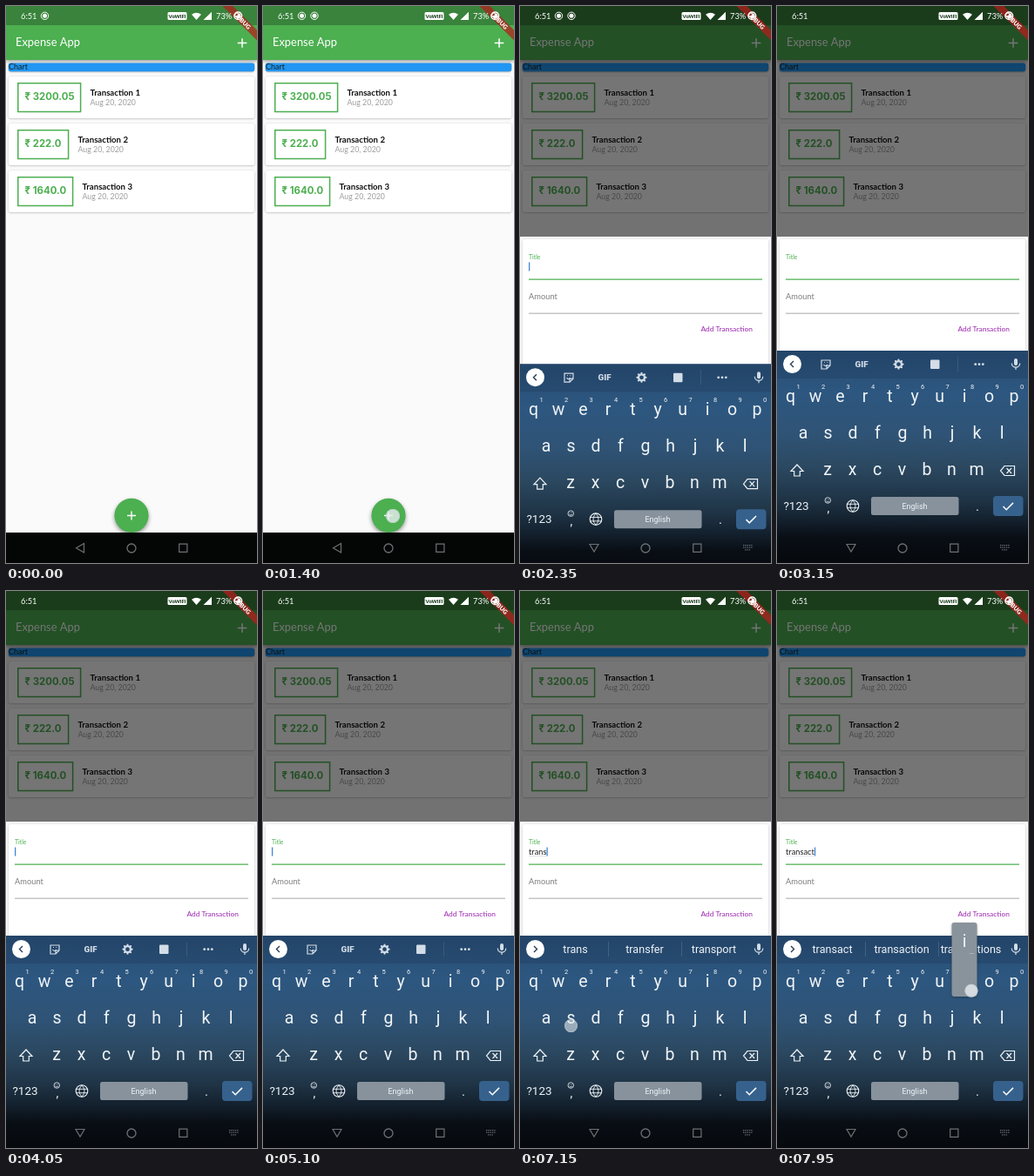
Write an HTML page with a canvas that moves like this. It is 288 px wide and 640 px high and loops after 8000 ms.

```html
<!DOCTYPE html>
<html lang="en">
<head>
<meta charset="utf-8">
<title>Expense App</title>
<style>
html, body { margin: 0; width: 100%; height: 100%; overflow: hidden; background: #000; }
canvas { display: block; width: 288px; height: 640px; }
</style>
</head>
<body>
<canvas id="stage"></canvas>
<script>
const canvas = document.getElementById('stage');
const c = canvas.getContext('2d');
const dpr = window.devicePixelRatio || 1;
canvas.width = 288 * dpr;
canvas.height = 640 * dpr;

const LOOP = 8000, GREEN = '#4caf50';
const SHEET_IN = 1500, FOCUS = 2040, KEYBOARD_IN = 2200;
const APP = 'Lato, sans-serif', KEYS = 'Roboto, sans-serif', BOLD = 'Inter, sans-serif';

const clamp = v => Math.max(0, Math.min(1, v));
const easeOut = v => 1 - (1 - clamp(v)) ** 3;

function text(str, x, y, size, color, { font = APP, weight = 400, align = 'left' } = {}) {
  c.font = `${weight} ${size}px ${font}`;
  c.textAlign = align;
  c.fillStyle = color;
  c.fillText(str, x, y);
}
const keyText = (str, x, y, size, weight = 400) =>
  text(str, x, y, size, '#f0f4f7', { font: KEYS, align: 'center', weight });

function fill(d, color) {
  c.fillStyle = color;
  c.fill(new Path2D(d));
}
function line(d, color, width = 1) {
  c.strokeStyle = color;
  c.lineWidth = width;
  c.stroke(new Path2D(d));
}
function box(x, y, w, h, color, r = 0) {
  c.fillStyle = color;
  c.beginPath();
  c.roundRect(x, y, w, h, r);
  c.fill();
}
function disc(x, y, r, color) {
  c.fillStyle = color;
  c.beginPath();
  c.arc(x, y, r, 0, 7);
  c.fill();
}
function ring(x, y, r, color, width = 1) {
  c.strokeStyle = color;
  c.lineWidth = width;
  c.beginPath();
  c.arc(x, y, r, 0, 7);
  c.stroke();
}
function shadowed(draw, blur = 2, dy = 0.8, alpha = 0.35) {
  c.save();
  c.shadowColor = `rgba(0,0,0,${alpha})`;
  c.shadowBlur = blur * dpr;
  c.shadowOffsetY = dy * dpr;
  draw();
  c.restore();
}
const card = (y, h, color) => shadowed(() => box(2.8, y, 282.4, h, color, 2.8), 2, 0.6, 0.3);

// A finger dot that fades out after release
function touch(t, x, y, down, up, r = 8) {
  const fade = 150;
  if (t < down || t > up + fade) return;
  c.globalAlpha = 0.8 * (1 - clamp((t - up) / fade));
  disc(x, y, r, '#e9eef0');
  ring(x, y, r - 0.5, '#c3ccd2');
  c.globalAlpha = 1;
}

function home() {
  box(0, 0, 288, 605, '#fafafa');
  shadowed(() => box(0, 0, 288, 62, GREEN), 4, 1.5);
  box(0, 0, 288, 22, '#39833c');
  text('Expense App', 11, 46.3, 12.9, '#fff');
  line('M265.7 42.5h10.6M271 37.2v10.6', '#fff', 1.5);

  card(65.5, 9.8, '#2196f3');
  text('Chart', 3, 73.4, 9, '#122');

  [['3200.05', 73], ['222.0', 59], ['1640.0', 64]].forEach(([amount, w], i) => {
    const y = 81 + 54 * i;
    card(y, 48, '#fff');
    c.strokeStyle = GREEN;
    c.lineWidth = 1.5;
    c.strokeRect(13.8, y + 7.7, w - 1.2, 32.8);
    text('₹ ' + amount, 21.5, y + 27.3, 11.4, GREEN, { font: BOLD, weight: 700 });
    text('Transaction ' + (i + 1), 23.5 + w, y + 22.3, 9.65, '#111', { weight: 700 });
    text('Aug 20, 2020', 23.5 + w, y + 33, 8.8, '#9e9e9e');
  });

  shadowed(() => disc(144, 585.3, 19.6, GREEN), 5, 2.5, 0.4);
  line('M139 585.5h10M144 580.5v10', '#fff', 1.4);
}

function sheet(t, typed) {
  const p = easeOut((t - SHEET_IN) / 250);
  if (!p) return;
  box(0, 0, 288, 605, `rgba(0,0,0,${0.54 * p})`);
  c.save();
  c.beginPath();
  c.rect(0, 0, 288, 605);
  c.clip();
  c.translate(0, 340 * (1 - p));
  box(0, 265, 288, 340, '#fafafa');
  card(268, 334, '#fff');

  const focused = t >= FOCUS;
  const f = easeOut((t - FOCUS) / 200);
  text('Title', 10, 303 - 12 * f, 9.3 - 2.4 * f, focused ? GREEN : '#808080');
  box(10, focused ? 313.4 : 313.8, 268, focused ? 1.4 : 0.7, focused ? GREEN : '#8c8c8c');
  text('Amount', 10, 337, 9.3, '#7d7d7d');
  box(10, 352.8, 268, 0.7, '#8c8c8c');
  text('Add Transaction', 207.5, 374, 8.4, '#9c27b0');

  text(typed, 10, 303, 9.3, '#222');
  const w = c.measureText(typed).width;
  if (typed) box(10, 304.2, w, 0.4, 'rgba(0,0,0,.3)');
  const blinkOn = Math.floor((t - 4750) / 650) % 2 === 0;
  if (focused && (typed || blinkOn)) box(10 + w, 294.5, 1.3, 10, '#4285d4');
  c.restore();
}

function debugBanner() {
  c.save();
  c.translate(288, 0);
  c.rotate(Math.PI / 4);
  box(-40, 19.6, 80, 8.4, 'rgba(183,28,28,.72)');
  text('DEBUG', 0, 26.4, 7, '#fff', { weight: 900, align: 'center' });
  c.restore();
}

function statusBar(t) {
  text('6:51', 17, 14.6, 9.3, '#fff');
  const recorders = t < 700 ? 1 : t < 2900 ? 2 : 0;
  for (let i = 0; i < recorders; i++) {
    ring(44.5 + 14.5 * i, 11.3, 4.2, '#fff');
    disc(44.5 + 14.5 * i, 11.3, 2.5, '#fff');
  }
  box(185.5, 7, 22, 9, '#fff', 1.5);
  text('VoWiFi', 196.5, 13.8, 6, '#284a2c', { weight: 900, align: 'center' });
  fill('M213 9.8Q218.5 5.8 224 9.8L218.5 16Z', '#fff');
  fill('M226.5 16H236V6.8Z', '#fff');
  text('73%', 241, 14.6, 9.3, '#fff');
  ring(266.3, 11.3, 4.3, '#fff', 1.5);
  fill('M266.3 11.3V8.3A3 3 0 1 1 263.3 11.3Z', '#fff');
}

const ROWS = [['qwertyuiop', 15.5, 449], ['asdfghjkl', 30, 491], ['zxcvbnm', 58, 533]];
function keyAt(ch) {
  const [letters, x, y] = ROWS.find(([row]) => row.includes(ch));
  return [x + 28.5 * letters.indexOf(ch), y];
}

// Each press: letter, time down, time up
const presses = [...'transacti'].map((ch, i) =>
  i ? [ch, 6060 + 220 * i, 6230 + 220 * i] : [ch, 5950, 6240]);

const SUGGESTIONS = [
  't thanks thank', 'tr try trying', 'tra travel train', 'tran transfer trans',
  'trans transfer transport', 'transa transaction transactions',
  'transac transaction transactions', 'transact transaction transactions'
];

function toolbar(typed) {
  disc(17.5, 411.5, 10.5, '#fff');
  line(typed ? 'M16 408l3.5 3.5l-3.5 3.5' : 'M19 408l-3.5 3.5l3.5 3.5', '#263c55', 1.4);
  const pale = '#d3dde7';
  if (typed) {
    SUGGESTIONS[typed.length - 1].split(' ').forEach((word, i) =>
      keyText(word, 63.5 + 79.5 * i, 416.3, 12.6));
    line('M101.5 403v17M185.5 403v17', 'rgba(255,255,255,.2)', 0.7);
  } else {
    line('M51 407h10v6l-4 4h-6zM61 413h-4v4M53.5 412q2 3 4 0M54 409.5h.8M57.5 409.5h.8', pale, 1.2);
    text('GIF', 97, 415.2, 9.8, pale, { font: KEYS, weight: 900, align: 'center' });
    ring(139.5, 411.7, 3.5, pale, 2.2);
    for (let i = 0; i < 8; i++) {
      const a = i * Math.PI / 4;
      disc(139.5 + 5 * Math.cos(a), 411.7 + 5 * Math.sin(a), 1.1, pale);
    }
    box(176, 406.5, 10.5, 10.5, pale, 1);
    line('M207.5 403v17', 'rgba(255,255,255,.15)', 0.7);
    for (let i = -1; i < 2; i++) disc(232 + 4.3 * i, 411.7, 1.4, pale);
  }
  box(272, 405, 4, 8, pale, 2);
  line('M269.3 410.5a4.7 4.7 0 0 0 9.4 0M274 415v3', pale, 1.2);
}

function keyboard(t, typed) {
  const p = easeOut((t - KEYBOARD_IN) / 250);
  if (!p) return;
  c.save();
  c.translate(0, 244 * (1 - p));
  const g = c.createLinearGradient(0, 396, 0, 640);
  [[0, '#274c72'], [0.2, '#2d5780'], [0.4, '#2f5375'], [0.55, '#2b4860'],
   [0.7, '#1f3446'], [0.8, '#13202d'], [0.88, '#090e15'], [1, '#06090d']].forEach(s => g.addColorStop(...s));
  box(0, 396, 288, 244, g);
  box(0, 396, 288, 32, 'rgba(20,40,70,.2)');
  toolbar(typed);

  for (const [letters] of ROWS) for (const ch of letters) {
    const [x, y] = keyAt(ch);
    keyText(ch, x, y + 6, 19.5);
  }
  for (let i = 0; i < 10; i++) keyText((i + 1) % 10, 24.5 + 28.5 * i, 439.5, 7.5);

  const ink = '#eef3f7';
  line('M23 527l7 7.5h-3.7v5.5h-6.6v-5.5h-3.7z', ink, 1.2);
  line('M261 528.5h11.5v11h-11.5l-4.5-5.5zM263.5 531l5.5 6M269 531l-5.5 6', ink, 1.2);
  keyText('?123', 22, 579, 13.5);
  keyText(',', 59, 582, 14);
  ring(58.3, 568, 3.3, ink, 0.8);
  line('M56.5 569q1.8 2 3.6 0M56.8 567h.8M59.1 567h.8', ink, 0.8);
  ring(87, 574.5, 6.8, ink, 1.1);
  line('M80.2 572.3h13.6M80.2 576.7h13.6M87 567.7q-6 6.8 0 13.6q6-6.8 0-13.6', ink, 0.9);
  box(108, 564, 100.5, 21, '#87929d', 2.5);
  keyText('English', 158, 577.8, 9);
  keyText('.', 230, 580, 15);
  box(248, 563, 34.5, 23, '#36618d', 4);
  line('M259.5 575l3.7 3.7l7.8-7.8', '#fff', 1.5);
  c.restore();

  presses.forEach(([ch, down, up], i) => {
    const [x, y] = keyAt(ch);
    if (t >= down && t < up) {
      shadowed(() => box(x - 14.5, y - 68, 29, 85, '#89939c', 3), 3);
      keyText(ch, x, y - 40, 19.5);
      keyText('…', x + 8.5, y - 32, 8);
    }
    touch(t, x + (i && 2 * i - 8), y + 7 + i * 0.4, down, up, 7.5);
  });
}

function navBar(t) {
  const up = t > KEYBOARD_IN + 60, gray = '#6e7073';
  line(up ? 'M80 618.5h10l-5 8.5z' : 'M89.5 617.5v10.4l-9-5.2z', gray, 1.2);
  ring(144, 623, 5, gray, 1.3);
  line('M198.7 618.2h9.2v9.2h-9.2z', gray, 1.2);
  if (t > FOCUS + 60) {
    c.setLineDash([1.3, 1]);
    line('M256 619.7h10.5M256 622.2h10.5M258 624.8h6.5', gray, 1.3);
    c.setLineDash([]);
  }
}

function draw(now) {
  const t = now % LOOP;
  const typed = presses.filter(([, , up]) => t >= up).map(([ch]) => ch).join('').slice(0, 8);
  c.setTransform(dpr, 0, 0, dpr, 0, 0);
  home();
  sheet(t, typed);
  debugBanner();
  statusBar(t);
  box(0, 605, 288, 35, '#040505');
  touch(t, 149, 586, 1300, 1440);
  touch(t, 90, 300, 1900, 1980);
  keyboard(t, typed);
  navBar(t);
  requestAnimationFrame(draw);
}
requestAnimationFrame(draw);
</script>
</body>
</html>
```
